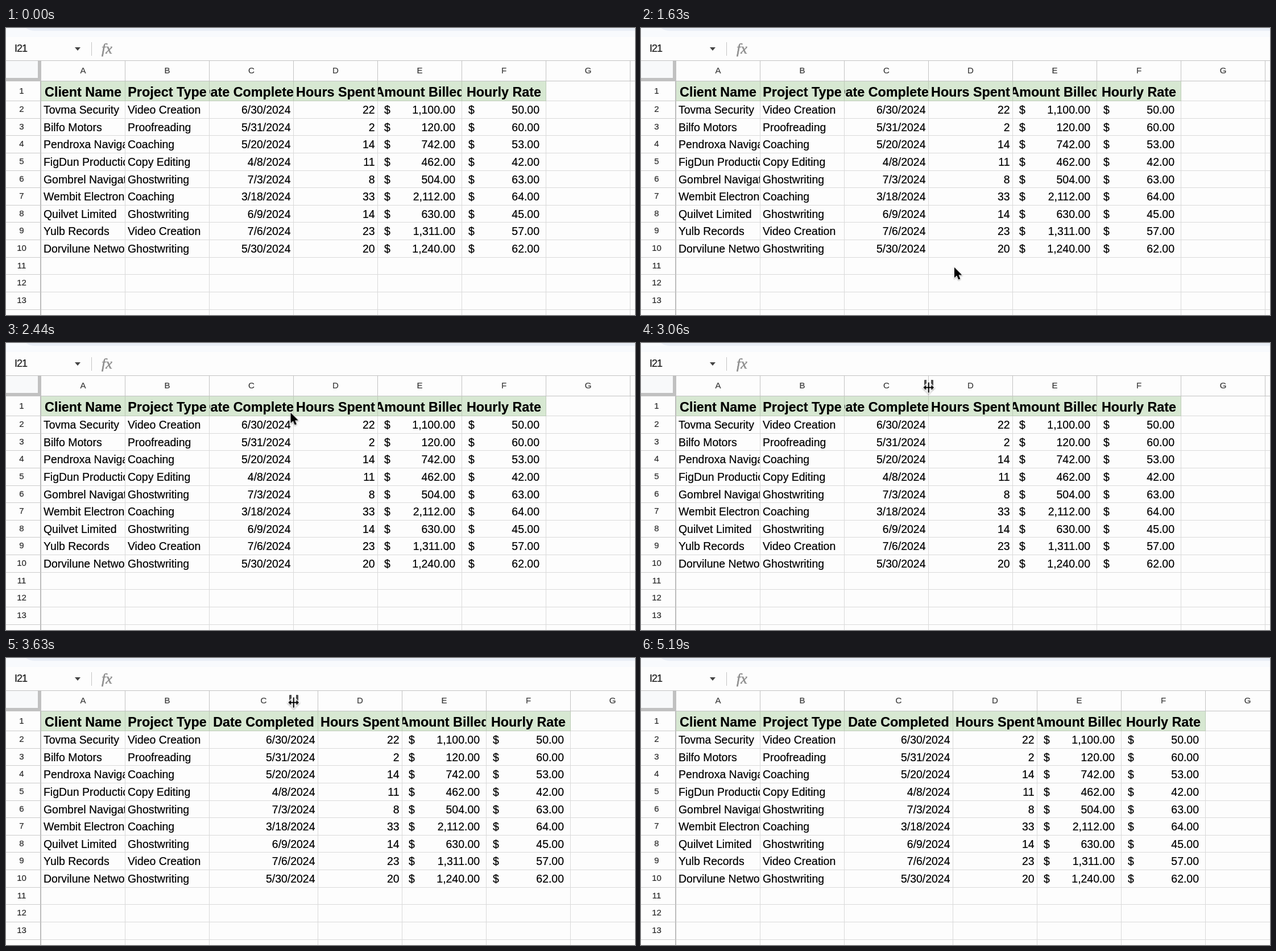
These frames come from a looping animation (1106 px wide and 506 px high, 5.81 s). An HTML page:

```html
<!DOCTYPE html>
<html lang="en">
<head>
<meta charset="utf-8">
<title>Fit a column to its text</title>
<style>
  :root { --loop: 5810ms; --line: #dadada; --edge: #c3c3c3; }
  * { box-sizing: border-box; }
  html, body { margin: 0; width: 100%; height: 100%; overflow: hidden; }
  body { position: relative; background: #fdfdfd; color: #000;
    font: 19.45px "Liberation Sans", Arial, sans-serif; white-space: nowrap;
    -webkit-text-stroke: .22px currentColor; }
  body > * { position: absolute; }

  /* Top bar */
  .strip { left: 0; top: 0; width: 100%; height: 16px; background: #f8fafd; overflow: hidden; }
  .strip i { position: absolute; left: 26px; right: 0; top: -20px; height: 25px;
    background: #e9eef6; border-radius: 0 0 0 24px; }
  .name { left: 15px; top: 25px; font-size: 18px; line-height: 22px; letter-spacing: -1px; color: #1c1c1c; }
  .arrow { left: 121px; top: 34px; border: solid transparent; border-width: 6px 5.7px 0;
    border-top-color: #444; }
  .rule { left: 150px; top: 25px; width: 1px; height: 24px; background: #c4c4c4; }
  .fx { left: 168px; top: 23px; color: #8e8e8e; -webkit-text-stroke-width: .6px;
    font: italic 26px/28px "Liberation Serif", "Times New Roman", serif; }

  /* Sheet */
  .sheet { left: 0; top: 57px; width: 1106px; height: 449px; overflow: hidden; display: flex;
    border-top: 1px solid var(--edge); }
  .col { flex: none; width: 148px; }
  .col > div { height: 30.63px; line-height: 31.6px; overflow: hidden;
    border: solid var(--line); border-width: 0 1px 1px 0; }
  .col > .letter { height: 36px; line-height: 33px; font-size: 15px; color: #3c3c3c;
    text-align: center; border-color: var(--edge); }
  .col > .title { height: 35px; line-height: 38.5px; font-size: 23.35px; font-weight: bold;
    display: flex; justify-content: center; background: #d7e8d2; border-color: #bdcbb8; }
  .col > .title.blank { background: none; border-color: var(--line); }
  .text { padding-left: 4px; }
  .num { padding-right: 4.5px; text-align: right; }
  .money { padding: 0 11px; display: flex; justify-content: space-between; }
  .rows { width: 62px; }
  .rows > div { padding-right: 5px; text-align: center; font-size: 15px; line-height: 27px;
    color: #2c2c2c; border-color: #cbcbcb; border-right: 2px solid #bcbcbc; }
  .rows > .corner { height: 36px; background: #f8f9fa; border: solid #c1c1c1; border-width: 0 6px 6px 0; }
  .rows > .first { height: 35px; line-height: 33px; }
  .fit { animation: fit var(--loop) step-end infinite; }

  /* Pointer and resize guides */
  .guide { left: 502px; top: 58px; width: 7px; height: 448px; background: #c4c4c4;
    animation: press var(--loop) step-end infinite; }
  .grip { left: 498px; top: 65px; width: 16px; height: 18px; border: solid #4c4c4c;
    border-width: 0 4.5px; border-radius: 1px; animation: resize var(--loop) step-end infinite; }
  .pointer { left: 0; top: 0; width: 1px; height: 1px; overflow: visible;
    animation: move var(--loop) linear infinite; }
  .pointer path { stroke: #fff; stroke-width: 1.6; paint-order: stroke;
    filter: drop-shadow(0 1.2px 1px rgba(0, 0, 0, .35)); }
  .tip { animation: tip var(--loop) step-end infinite; }
  .pointer .cross { stroke-width: 3; animation: resize var(--loop) step-end infinite; }

  @keyframes fit { 0% { width: 148px } 62.478%, 100% { width: 191px } }
  @keyframes press {
    0%, 59.208%, 62.478%, 100% { visibility: hidden }
    56.971%, 60.241% { visibility: visible }
  }
  @keyframes tip {
    0%, 45.095%, 89.329%, 100% { visibility: hidden }
    28.055%, 81.239% { visibility: visible }
  }
  @keyframes resize {
    0%, 81.239%, 100% { visibility: hidden }
    45.095% { visibility: visible }
  }
  @keyframes move {
    0%, 28.055% { transform: translate(551px, 422px); animation-timing-function: cubic-bezier(.4, .05, .4, 1) }
    37.694%, 40.9% { transform: translate(499.5px, 131px) }
    41.997% { transform: translate(500.5px, 123px) }
    45.095% { transform: translate(504px, 95px); animation-timing-function: ease-out }
    50.602%, 52.6% { transform: translate(505.7px, 82.5px) }
    52.668%, 79.6% { transform: translate(505.7px, 78.5px) }
    79.69% { transform: translate(507px, 80px) }
    81.239% { transform: translate(510px, 98px); animation-timing-function: cubic-bezier(.3, .2, .75, .75) }
    89.329%, 100% { transform: translate(556px, 535px) }
  }
</style>
</head>
<body>
<div class="strip"><i></i></div>
<div class="name">I21</div>
<div class="arrow"></div>
<div class="rule"></div>
<div class="fx">fx</div>
<div class="sheet" id="sheet"></div>
<div class="guide"></div>
<div class="grip"></div>
<svg class="pointer">
  <path class="tip" d="M0 0V18.6L4.3 14.6 7.2 21.6 10.4 20.2 7.5 13.4H13.4Z"/>
  <path class="cross" d="M-1-9H1V-1H4.6V-4.6L9.4 0 4.6 4.6V1H1V9H-1V1H-4.6V4.6L-9.4 0-4.6-4.6V-1H-1Z"/>
</svg>
<script>
  const ROWS = 14;
  const jobs = [
    ['Tovma Security', 'Video Creation', '6/30/2024', 22, 50],
    ['Bilfo Motors', 'Proofreading', '5/31/2024', 2, 60],
    ['Pendroxa Navigation', 'Coaching', '5/20/2024', 14, 53],
    ['FigDun Productions', 'Copy Editing', '4/8/2024', 11, 42],
    ['Gombrel Navigation', 'Ghostwriting', '7/3/2024', 8, 63],
    ['Wembit Electronics', 'Coaching', '3/18/2024', 33, 64],
    ['Quilvet Limited', 'Ghostwriting', '6/9/2024', 14, 45],
    ['Yulb Records', 'Video Creation', '7/6/2024', 23, 57],
    ['Dorvilune Networks', 'Ghostwriting', '5/30/2024', 20, 62],
  ];
  const columns = [
    ['Client Name', 'text', j => j[0]],
    ['Project Type', 'text', j => j[1]],
    ['Date Completed', 'num', j => j[2]],
    ['Hours Spent', 'num', j => j[3]],
    ['Amount Billed', 'money', j => money(j[3] * j[4])],
    ['Hourly Rate', 'money', j => money(j[4])],
    ['', 'text', () => ''],
    ['', 'text', () => ''],
  ];

  function money(value) {
    const digits = value.toLocaleString('en-US', { minimumFractionDigits: 2 });
    return `<span>$</span><span>${digits}</span>`;
  }
  const cell = (type, html) => `<div class="${type}">${html}</div>`;

  function column([title, type, read], i) {
    let html = cell('letter', 'ABCDEFGH'[i]) + cell(title ? 'title' : 'title blank', title);
    for (let r = 0; r < ROWS - 1; r++) {
      html += jobs[r] ? cell(type, read(jobs[r])) : cell('text', '');
    }
    return `<div class="col${i === 2 ? ' fit' : ''}">${html}</div>`;
  }

  let numbers = cell('corner', '');
  for (let r = 1; r <= ROWS; r++) numbers += cell(r === 1 ? 'first' : '', r);
  document.getElementById('sheet').innerHTML =
    `<div class="col rows">${numbers}</div>` + columns.map(column).join('');
</script>
</body>
</html>
```
